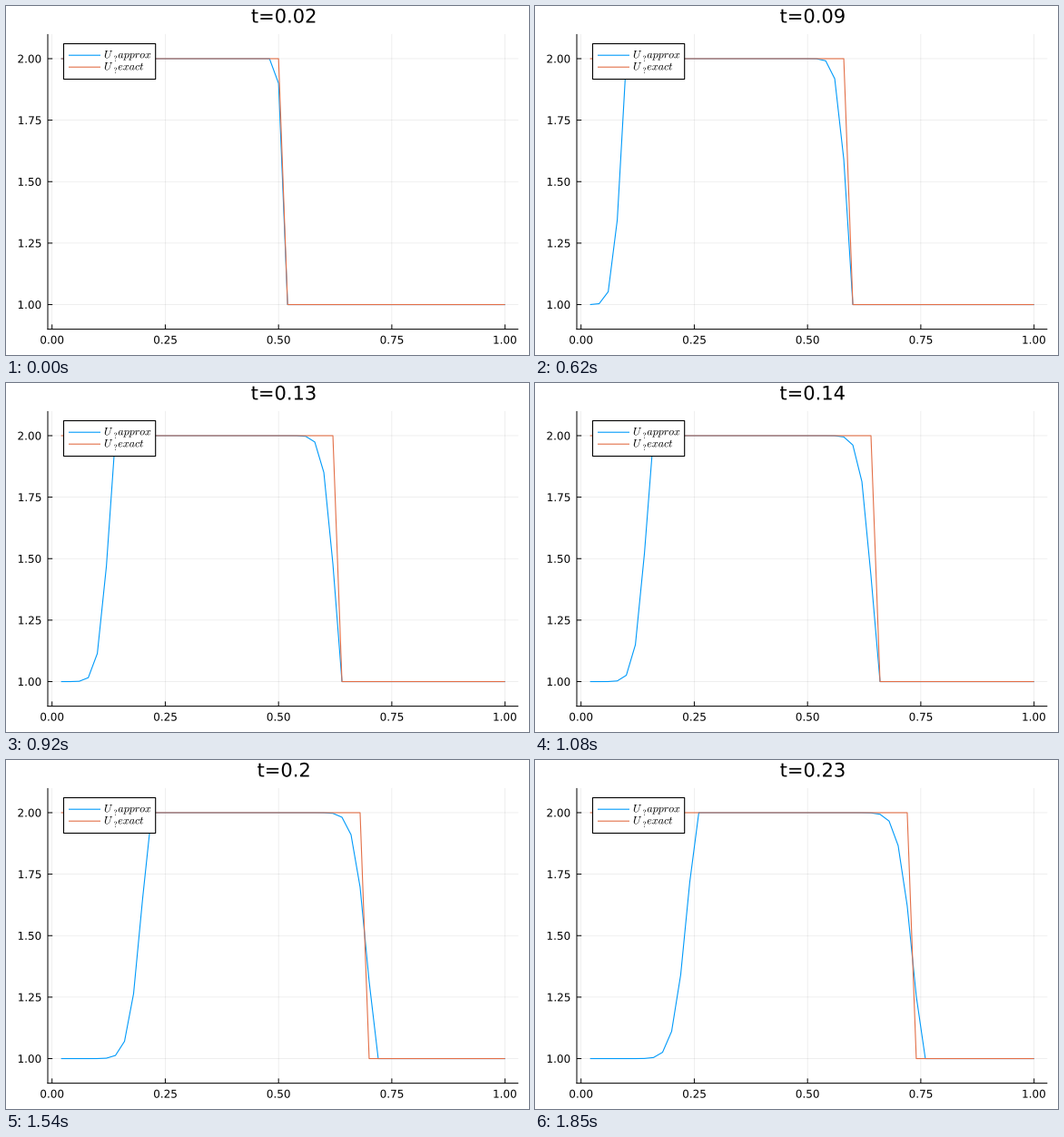
A matplotlib script that plays this animation: 576x384 px, repeating every 2.01 s.

```python
import numpy as np
import matplotlib.pyplot as plt
from matplotlib.animation import FuncAnimation
from matplotlib.patches import PathPatch, Rectangle
from matplotlib.textpath import TextPath
from matplotlib.transforms import Affine2D

W, H, DPI = 576, 384, 96
PX = 72 / DPI                       # points per pixel
LEFT, RIGHT, TOP, BOTTOM = 46.0, 564.3, 30.9, 355.6
XLIM, YLIM = (-0.0094, 1.0294), (0.9, 2.1)
BLUE, ORANGE = "#009AFA", "#E36F47"

plt.rcParams["mathtext.fontset"] = "cm"

# Advection of a step at unit speed, first-order upwind scheme
N, STEPS, CFL = 50, 13, 0.9
DX = 1 / N
DT = CFL * DX
x = DX * np.arange(1, N + 1)


def solve():
    u = np.where(np.arange(N + 1) < N // 2, 2.0, 1.0)
    states = []
    for _ in range(STEPS):
        u[1:] -= CFL * (u[1:] - u[:-1])
        u[0] = 1.0                  # inflow value
        states.append(u[1:].copy())
    return states


def exact(t):
    return np.where(x < 0.5 + t - 1e-9, 2.0, 1.0)


approx = solve()

# Each state is held for about 1/6.5 s, counted in 10 ms ticks
TICK, TICKS = 10, 201
starts = np.round(np.arange(STEPS) * 200 / STEPS)

# One axes in pixel coordinates, so that nothing is snapped
fig = plt.figure(figsize=(W / DPI, H / DPI), dpi=DPI, facecolor="white")
ax = fig.add_axes([0, 0, 1, 1])
ax.set(xlim=(0, W), ylim=(H, 0))
ax.axis("off")


def to_x(v):
    return LEFT + (v - XLIM[0]) / (XLIM[1] - XLIM[0]) * (RIGHT - LEFT)


def to_y(v):
    return BOTTOM - (v - YLIM[0]) / (YLIM[1] - YLIM[0]) * (BOTTOM - TOP)


def line(xs, ys, color="black", width=1.0, **kw):
    return ax.plot(xs, ys, color=color, linewidth=width * PX, snap=False,
                   solid_capstyle="butt", **kw)[0]


def glyphs(s, px, py, size, align=0.0):
    """Text outline with its baseline at py; align 0, 0.5, 1 = left to right."""
    path = TextPath((0, 0), s, size=size, prop={"family": "DejaVu Sans"})
    box = path.get_extents()
    shift = px - box.x0 - align * box.width
    return Affine2D().scale(1, -1).translate(shift, py).transform_path(path)


def text(*args):
    return ax.add_patch(PathPatch(glyphs(*args), facecolor="black",
                                  linewidth=0, snap=False))


# Grid, ticks and labels
for v in np.linspace(0, 1, 5):
    px, py = to_x(v), to_y(1 + v)
    line([px, px], [TOP, BOTTOM], width=0.6, alpha=0.1)
    line([LEFT, RIGHT], [py, py], width=0.6, alpha=0.1)
    line([px, px], [BOTTOM, BOTTOM - 5.2])
    line([LEFT, LEFT + 5.2], [py, py])
    text(f"{v:.2f}", px, 371.6, 12, 0.5)
    text(f"{1 + v:.2f}", 38.4, py + 4.5, 12, 1)
line([LEFT, LEFT], [TOP, BOTTOM + 0.5])
line([LEFT - 0.5, RIGHT], [BOTTOM, BOTTOM])

approx_line = line(to_x(x), to_y(approx[0]), BLUE, 1.1)
exact_line = line(to_x(x), to_y(exact(DT)), ORANGE, 1.1)

# Legend
ax.add_patch(Rectangle((63.5, 41.5), 101.2, 39, facecolor="white", zorder=3,
                       edgecolor="black", linewidth=1.1 * PX, snap=False))
for y, color, name in [(54.2, BLUE, "approx"), (67.2, ORANGE, "exact")]:
    line([69, 104], [y, y], color, 1.1, zorder=4)
    for part in (text("$U$", 108.8, y + 3.1, 12),
                 text("$?$", 119, y + 6.6, 8.6),
                 text(f"${name}$", 123.8, y + 3.1, 12)):
        part.set_zorder(4)


def title_path(t):
    return glyphs(f"t={round(t, 2)}", 305.4, 18.4, 21, 0.5)


title = text("t=0", 305.4, 18.4, 21, 0.5)


def update(tick):
    k = int(np.searchsorted(starts, tick, side="right")) - 1
    t = (k + 1) * DT
    approx_line.set_ydata(to_y(approx[k]))
    exact_line.set_ydata(to_y(exact(t)))
    title.set_path(title_path(t))
    return approx_line, exact_line, title


anim = FuncAnimation(fig, update, frames=TICKS, interval=TICK,
                     repeat=True, repeat_delay=0, blit=False)
plt.show()
```
